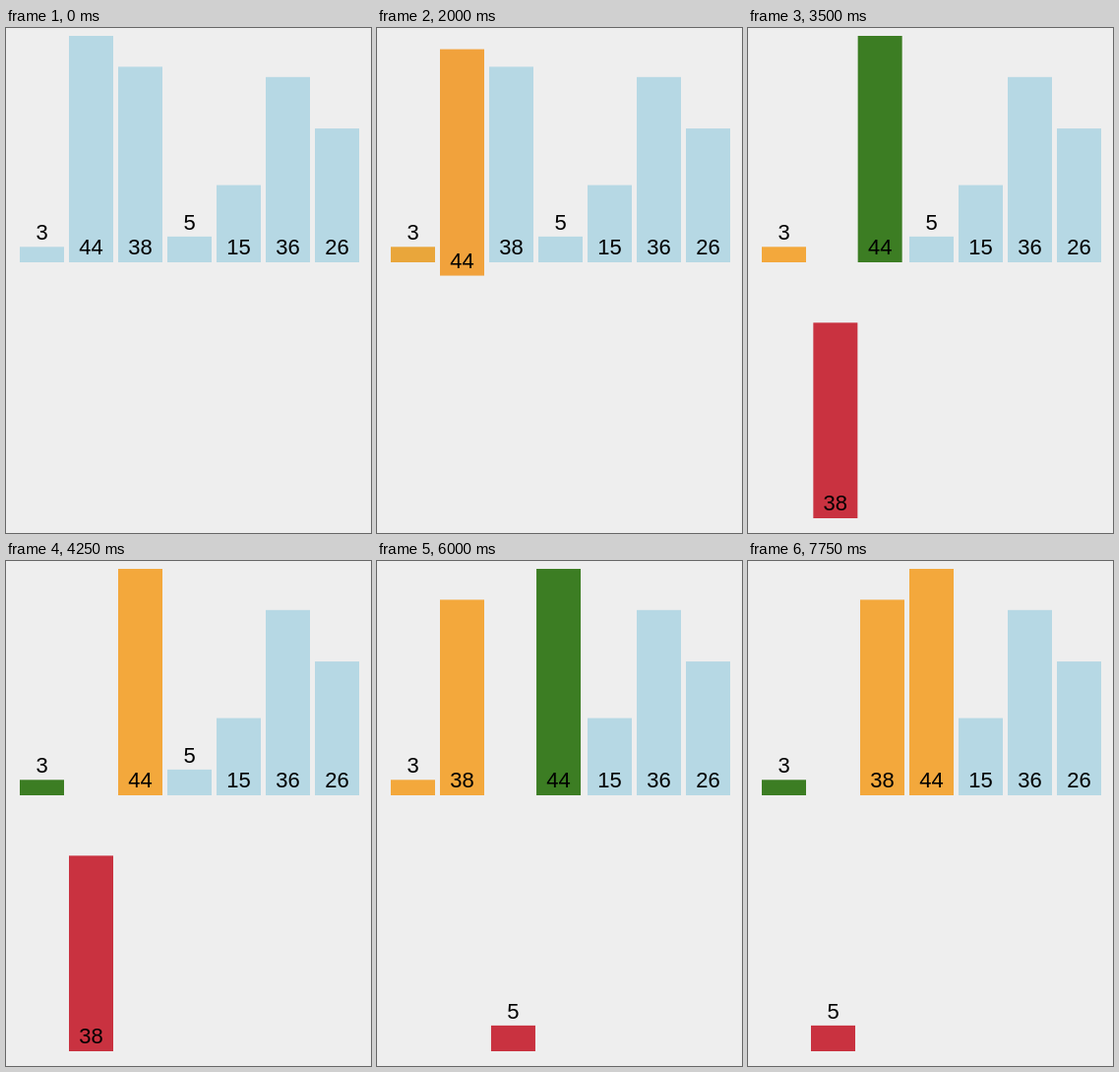
An HTML page for the animation above (8000 ms loop, 371x513 px).

```html
<!DOCTYPE html>
<html lang="en">
<head>
<meta charset="utf-8">
<title>Insertion sort</title>
<style>
  html, body { margin: 0; width: 100%; height: 100%; overflow: hidden; background: #eee; }
  svg { display: block; width: 371px; height: 513px; }
  text { font: 22px "Liberation Sans", Arial, sans-serif; text-anchor: middle; }
</style>
</head>
<body>
<svg viewBox="0 0 371 513"></svg>
<script>
const BLUE = [182, 216, 228], ORANGE = [243, 168, 60], GREEN = [60, 125, 35], RED = [201, 50, 64];
const LOOP = 8000, TICK = 250;              // the picture refreshes four times a second
const START = 273, STEP = 499.2, MOVE = 300;
const BASE = 238, UNIT = 230 / 44, DROP = 260;

const svg = document.querySelector('svg');

function add(parent, tag, attrs) {
  const el = document.createElementNS('http://www.w3.org/2000/svg', tag);
  for (const name in attrs) el.setAttribute(name, attrs[name]);
  return parent.appendChild(el);
}

const bars = [3, 44, 38, 5, 15, 36, 26].map((value, slot) => {
  const height = value * UNIT;
  const group = add(svg, 'g', {});
  const rect = add(group, 'rect', { y: BASE - height, width: 45, height });
  const label = add(group, 'text', { x: 22.5, y: height < 30 ? BASE - height - 7 : BASE - 8 });
  label.textContent = value;
  return { value, slot, down: 0, color: BLUE, group, rect };
});

// Run the sort and record the bars after every step.
const steps = [];
const record = () => steps.push(bars.map(({ slot, down, color }) => ({ slot, down, color })));

record();
bars[0].color = ORANGE;
record();
const order = [...bars];
for (let i = 1; i < 4; i++) {
  const key = order[i];
  key.color = RED;
  key.down = 1;
  record();
  for (let j = i - 1; j >= 0; j--) {
    const other = order[j];
    other.color = GREEN;
    record();
    const bigger = other.value > key.value;
    if (bigger) {
      [order[j], order[j + 1]] = [key, other];
      other.slot = j + 1;
      key.slot = j;
      record();
    }
    other.color = ORANGE;
    if (!bigger) break;
  }
  key.color = ORANGE;
  key.down = 0;
  record();
}

const mix = (a, b, p) => a + (b - a) * p;
const ease = u => u < 0.5 ? 4 * u ** 3 : 1 - 4 * (1 - u) ** 3;

function draw(now) {
  const t = Math.floor(now % LOOP / TICK) * TICK - START;
  const n = Math.floor(t / STEP) + 1;
  const p = ease(Math.min(1, (t - (n - 1) * STEP) / MOVE));
  bars.forEach((bar, i) => {
    const to = steps[n][i], from = n ? steps[n - 1][i] : to;
    const x = 14 + 50 * mix(from.slot, to.slot, p);
    const y = DROP * mix(from.down, to.down, p);
    const color = from.color.map((c, k) => Math.round(mix(c, to.color[k], p)));
    bar.group.setAttribute('transform', `translate(${x} ${y})`);
    bar.rect.setAttribute('fill', `rgb(${color})`);
  });
}

let origin;
function frame(now) {
  origin ??= now;
  draw(now - origin);
  requestAnimationFrame(frame);
}
draw(0);
requestAnimationFrame(frame);
</script>
</body>
</html>
```
